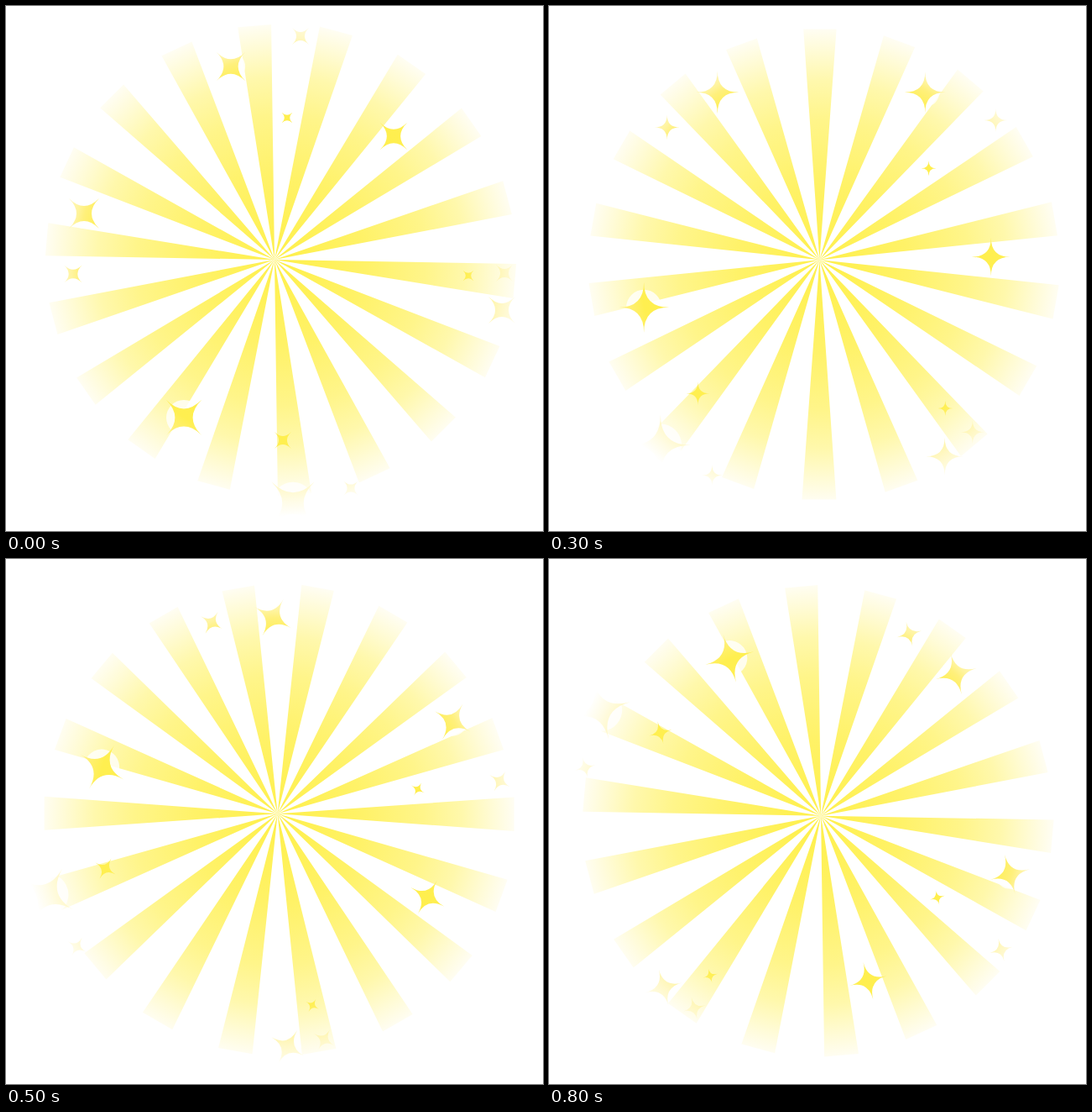
These frames come from a looping animation (640x625 px, 900 ms). An HTML page:

```html
<!DOCTYPE html>
<html lang="en">
<head>
<meta charset="utf-8">
<title>Sunburst</title>
<style>
html, body { margin: 0; width: 100%; height: 100%; overflow: hidden; background: #fff; }
svg { display: block; width: 100%; height: 100%; }
</style>
</head>
<body>
<svg viewBox="0 0 640 625">
  <defs>
    <radialGradient id="rayFill" gradientUnits="userSpaceOnUse" cx="328" cy="303" r="288">
      <stop offset="0" stop-color="#fff04a"/>
      <stop offset=".35" stop-color="#fff268"/>
      <stop offset=".6" stop-color="#fff58a"/>
      <stop offset=".76" stop-color="#fff8ac"/>
      <stop offset=".88" stop-color="#fffbd4"/>
      <stop offset="1" stop-color="#fffefa"/>
    </radialGradient>
    <radialGradient id="starFill" gradientUnits="userSpaceOnUse" cx="328" cy="303" r="305">
      <stop offset="0" stop-color="#ffee44"/>
      <stop offset=".72" stop-color="#ffef50"/>
      <stop offset=".79" stop-color="#fff07c"/>
      <stop offset=".82" stop-color="#fff4a0"/>
      <stop offset=".88" stop-color="#fff8c8"/>
      <stop offset=".94" stop-color="#fffce6"/>
      <stop offset="1" stop-color="#fff"/>
    </radialGradient>
  </defs>
  <g id="burst">
    <path id="rays" fill="url(#rayFill)"/>
    <path id="halos" fill="#fff" fill-opacity=".8"/>
    <path id="stars" fill="url(#starFill)"/>
  </g>
</svg>
<script>
const PIVOT = [321, 305];
const HUB = [320, 302];
const RAYS = 18, FIRST = -4.9, HALF = 4.1;
const STEP_MS = 100, STEPS = 9, STEP_DEG = 15;

// x, y, tip radius
const STARS = [
  [268, 72, 24.5], [462, 155, 23], [93, 247, 25.5], [212, 490, 30],
  [351, 36, 14], [335, 133, 9], [80, 319, 15], [551, 321, 9],
  [594, 318, 14], [591, 362, 22.5], [330, 517, 14], [342, 592, 36],
  [411, 574, 12.5]
];

const el = id => document.getElementById(id);
const fmt = p => p.map(v => v.toFixed(2)).join(' ');

// Angles run clockwise from straight up.
function polar([x, y], deg, r) {
  const a = deg * Math.PI / 180;
  return [x + r * Math.sin(a), y - r * Math.cos(a)];
}

function ray(i) {
  const deg = FIRST + i * 360 / RAYS;
  const reach = 280 + 7.5 * Math.sin(deg * Math.PI / 180);
  const edge = reach / Math.cos(HALF * Math.PI / 180);
  return `M${fmt(HUB)}L${fmt(polar(HUB, deg - HALF, edge))}L${fmt(polar(HUB, deg + HALF, edge))}Z`;
}

function star([x, y, r]) {
  const tip = k => fmt(polar([x, y], 45 + 90 * k, r));
  let d = 'M' + tip(0);
  for (let k = 1; k <= 4; k++) d += `Q${x} ${y} ${tip(k)}`;
  return d + 'Z';
}

function halo([x, y, r]) {
  const h = r * 0.7;
  return `M${x - h} ${y}a${h} ${h} 0 1 1 ${2 * h} 0a${h} ${h} 0 1 1 ${-2 * h} 0Z`;
}

el('rays').setAttribute('d', Array.from({ length: RAYS }, (_, i) => ray(i)).join(''));
el('halos').setAttribute('d', STARS.filter(s => s[2] > 20).map(halo).join(''));
el('stars').setAttribute('d', STARS.map(star).join(''));

const burst = el('burst');
const start = performance.now();

function draw(ms) {
  const step = Math.floor(ms / STEP_MS) % STEPS;
  burst.setAttribute('transform', `rotate(${step * STEP_DEG} ${PIVOT})`);
}

function tick() {
  draw(performance.now() - start);
  requestAnimationFrame(tick);
}

draw(0);
requestAnimationFrame(tick);
</script>
</body>
</html>
```
